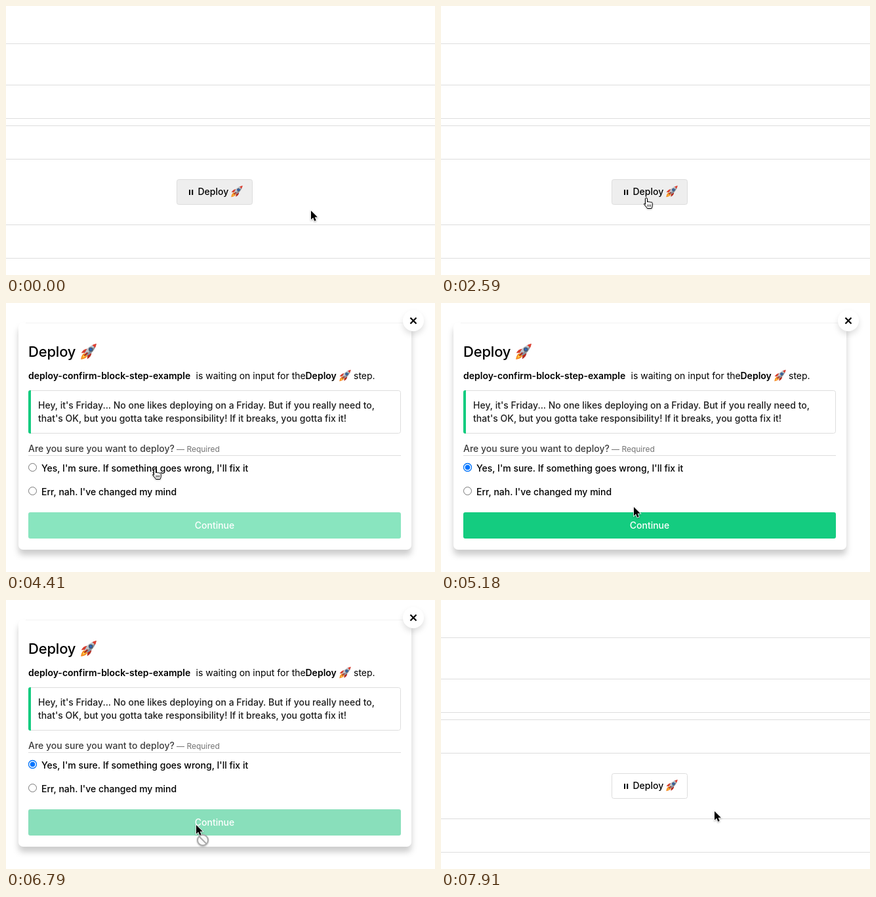
Recreate the animation shown at these times as an HTML page. Size 654x410 px, loop 8 s.

```html
<!DOCTYPE html>
<html lang="en">
<head>
<meta charset="utf-8">
<title>Deploy confirmation</title>
<style>
html, body { margin: 0; width: 100%; height: 100%; overflow: hidden; background: #fff; }
svg { display: block; width: 654px; height: 410px; }
text { font: 500 14px Inter, "Liberation Sans", sans-serif; white-space: pre; }
.plain { font-weight: 400; }
.bold { font-weight: 600; }
.title { font-size: 22px; letter-spacing: -.2px; }
.note { font-weight: 400; font-size: 12px; fill: #737373; }
.line { stroke: #ddd; fill: none; }
.radio { fill: #fff; stroke: #767676; }
#card { filter: drop-shadow(0 8px 5px rgba(0,0,0,.2)); }
#close { filter: drop-shadow(0 5px 4px rgba(0,0,0,.12)); }
#cursor { filter: drop-shadow(0 1px 1px rgba(0,0,0,.3)); }
</style>
</head>
<body>
<svg viewBox="0 0 654 410">
  <defs>
    <symbol id="rocket" viewBox="0 0 24 24">
      <path fill="#f58a1f" d="M7 14Q2 15 1 23Q9 22 10.500 17.500Z"/>
      <path fill="#ffd34d" d="M7 16Q4 17 3.200 21Q7 20 9 17.800Z"/>
      <path fill="#d6402f" d="M11 8Q5 7.500 1.500 14L8 13.500Z"/>
      <path fill="#b52d22" d="M16 13Q16.500 19 10 22.500L10.500 16Z"/>
      <path fill="#bcc5cd" d="M6.500 14Q10 4 23 1Q20 14 10 17.500Z"/>
      <path fill="#86919c" d="M8.500 16L22 3.500Q19 14 10 17.500Z"/>
      <path fill="#df3f30" d="M17 3Q20 1.600 23 1Q22.400 4.500 21 7Q19.500 4.500 17 3Z"/>
      <circle cx="15" cy="9" r="2.500" fill="#2c65b5" stroke="#4b535c"/>
      <path stroke="#a92c22" stroke-width="2" d="M6 18L10.500 13.500"/>
    </symbol>
  </defs>

  <g id="page">
    <path class="line" d="M0 57.500H654M0 120.500H654M0 171.500H654M0 182.500H654M0 233.500H654M0 333.500H654M0 384.500H654"/>
    <rect id="deploy" class="line" x="260.500" y="264.500" width="115" height="38" rx="3"/>
    <path d="M279 280h2v8h-2zM283.200 280h2v8h-2z"/>
    <text x="292.500" y="288">Deploy</text>
    <use href="#rocket" x="342.500" y="273" width="19" height="19"/>
  </g>

  <g id="modal">
    <rect id="card" x="19" y="30" width="599" height="346" rx="7" fill="#fff"/>
    <path d="M30 30.500H610" stroke="#f3f3f3"/>
    <circle id="close" cx="621" cy="27" r="16" fill="#fff"/>
    <path d="M616.500 22.500l9 9m0-9l-9 9" stroke="#000" stroke-width="2.200"/>

    <text class="title" x="34" y="82">Deploy</text>
    <use href="#rocket" x="113" y="61" width="26" height="26"/>
    <text class="bold" x="34" y="116">deploy-confirm-block-step-example</text>
    <text class="plain" x="289.500" y="116">is waiting on input for the</text>
    <text class="bold" x="456.500" y="116">Deploy</text>
    <use href="#rocket" x="507.500" y="101" width="19" height="19"/>
    <text class="plain" x="530" y="116">step.</text>

    <rect class="line" x="34.500" y="133.500" width="567" height="65" rx="3"/>
    <path d="M38 133V199H37q-3 0-3-3V136q0-3 3-3Z" fill="#14cc80"/>
    <g fill="#1d1d1d">
      <text x="49" y="161">Hey, it's Friday... No one likes deploying on a Friday. But if you really need to,</text>
      <text x="49" y="181">that's OK, but you gotta take responsibility! If it breaks, you gotta fix it!</text>
    </g>

    <text x="34" y="227" fill="#3d3d3d">Are you sure you want to deploy?</text>
    <text class="note" x="260" y="227">— Required</text>
    <path class="line" d="M34 232.500H602"/>
    <circle class="radio" cx="40.500" cy="250.500" r="6"/>
    <g id="checked">
      <circle cx="40.500" cy="250.500" r="6" fill="#fff" stroke="#0075ff" stroke-width="1.300"/>
      <circle cx="40.500" cy="250.500" r="3.800" fill="#0075ff"/>
    </g>
    <text x="54" y="257">Yes, I'm sure. If something goes wrong, I'll fix it</text>
    <circle class="radio" cx="40.500" cy="286.500" r="6"/>
    <text x="54" y="293">Err, nah. I've changed my mind</text>

    <rect id="continue" x="34" y="319" width="568" height="40" rx="3"/>
    <text x="318" y="344" text-anchor="middle" fill="#fff">Continue</text>
  </g>

  <g id="cursor">
    <path id="arrow" d="M0 0V13.500L3.200 10.600L5.300 15.700L7.700 14.700L5.600 9.800H9.800Z"
      stroke="#fff" stroke-width="1.600" paint-order="stroke"/>
    <g id="hand" fill="#fff" stroke="#000" stroke-linejoin="round">
      <path d="M-1.500 9.500V1a1.500 1.500 0 0 1 3 0V6a1.400 1.400 0 0 1 2.700 .2a1.400 1.400 0 0 1 2.600 .5a1.300 1.300 0 0 1 2.400 .8V11q0 2-1.200 4.500H1.500Q.5 13.500-2.800 10c-1.500-1.800 0-3 1.300-.5Z"/>
      <path d="M2 9.500v3.500M4.200 9.500v3.500M6.400 9.500v3.500" stroke-width=".8"/>
    </g>
    <g id="ban" stroke="#aaa" stroke-width="2">
      <circle cx="10" cy="23" r="8" fill="#fafafa"/>
      <path d="M4.500 17.500l11 11"/>
    </g>
  </g>
</svg>
<script>
const LOOP = 8000, STEP = 70;
const el = id => document.getElementById(id);
const show = (id, on) => el(id).style.display = on ? '' : 'none';
const ramp = (t, from, to) => Math.min(1, Math.max(0, (t - from) / (to - from)));
const smooth = u => u * u * (3 - 2 * u);
const easeOut = u => 1 - (1 - u) ** 2;
const linear = u => u;

// Pointer moves: start, end, target x, target y, easing
const moves = [
  [910, 1540, 313, 293, smooth],
  [3290, 3430, 270, 272, linear],
  [3430, 3710, 230, 254, easeOut],
  [3780, 3920, 227, 253, linear],
  [4970, 5180, 294, 311, linear],
  [5180, 5460, 290, 343, easeOut],
  [7490, 7910, 417, 322, smooth]
];

function pointerAt(t) {
  let x = 465, y = 312;
  for (const [from, to, tx, ty, ease] of moves) {
    const k = ease(ramp(t, from, to));
    x += (tx - x) * k;
    y += (ty - y) * k;
  }
  return [x, y];
}

const inside = (x, y, left, top, right, bottom) =>
  x >= left && x <= right && y >= top && y <= bottom;

function draw(time) {
  const t = Math.floor(time / STEP) * STEP;
  const modal = ramp(t, 2730, 3150) - ramp(t, 7210, 7420);
  const open = t >= 2800 && t < 7420;
  const submitted = t >= 5740;
  const [x, y] = pointerAt(t);

  el('page').style.opacity = 1 - modal;
  el('modal').style.opacity = modal;
  el('deploy').style.fill = t < 3150 ? '#eee' : '#fff';

  show('checked', t >= 4480);
  const active = ramp(t, 4410, 4760) - ramp(t, 5670, 5950);
  el('continue').style.fill = submitted ? '#14bf78' : '#14cc80';
  el('continue').style.fillOpacity = .5 + .5 * active;

  const hand = open
    ? inside(x, y, 34, 240, 373, 264) || inside(x, y, 34, 276, 261, 300) ||
      !submitted && inside(x, y, 34, 319, 602, 359)
    : inside(x, y, 260, 264, 376, 303);
  show('hand', hand);
  show('arrow', !hand);
  show('ban', open && submitted);
  el('cursor').setAttribute('transform', `translate(${Math.round(x)} ${Math.round(y)})`);
}

function tick() {
  draw(performance.now() % LOOP);
  requestAnimationFrame(tick);
}
tick();
</script>
</body>
</html>
```
